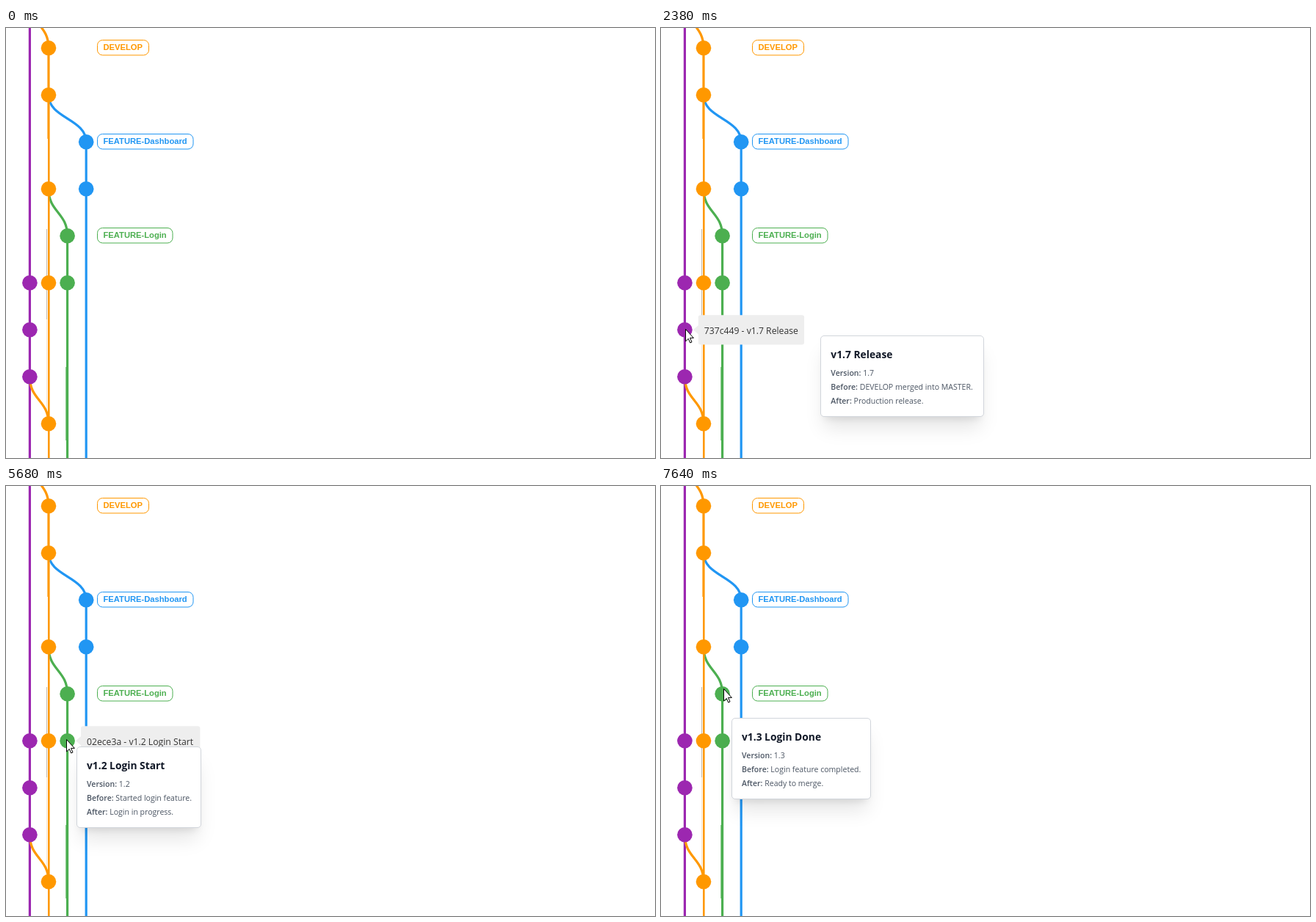
Animation, 884 px wide and 586 px high, one loop 8 s. Source, as an HTML page:

```html
<!DOCTYPE html>
<html lang="en">
<head>
<meta charset="utf-8">
<title>Branch graph</title>
<style>
  html, body { margin: 0; width: 100%; height: 100%; overflow: hidden; background: #fff; }
  #stage { position: relative; width: 884px; height: 586px; overflow: hidden; }
  svg { position: absolute; left: 0; top: 0; }
  .label { font: bold 11.2px "Liberation Sans", Arial, sans-serif; }
  .tip text { font: 12.2px "Open Sans", "Noto Sans", sans-serif; fill: #333; }
  .card {
    position: absolute; box-sizing: border-box; height: 111px; padding: 12px 13px 0;
    border: 1px solid #d1d5db; border-radius: 5px; background: #fff; color: #4b5563;
    font: 10.55px/19px "Open Sans", "Noto Sans", sans-serif; white-space: nowrap; opacity: 0;
    box-shadow: 0 20px 25px -5px rgba(0,0,0,.1), 0 8px 10px -6px rgba(0,0,0,.1);
  }
  .card h3 { margin: 0 0 3.5px; font-size: 13.8px; line-height: 25px; font-weight: 700; color: #111827; }
  .card p { margin: 0; }
  .card b { font-weight: 600; }
</style>
</head>
<body>
<div id="stage">
  <svg id="graph" width="884" height="586"></svg>
  <svg id="pointer" width="16" height="24" viewBox="-1 -1 16 24">
    <path d="M.5 .5V17L4.3 13.4L6.7 19L9 18L6.6 12.4H11.4Z" fill="#fff" stroke="#000" stroke-linejoin="round"/>
  </svg>
</div>
<script>
const LOOP = 8000;
const STEP = 1000 / 15;
const stage = document.getElementById('stage');
const graph = document.getElementById('graph');
const pointer = document.getElementById('pointer');

// Graph: one column per branch, one row per commit
const col = i => 32.4 + 25.6 * i;
const row = i => 27.3 + 64 * i;
const COLORS = ['#9c27b0', '#ff9800', '#4caf50', '#2196f3'];
const COMMITS = [[5, 6, 7], [0, 1, 3, 5, 8], [4, 5], [2, 3]];

const line = (d, color, width = 3.2) =>
  `<path d="${d}" fill="none" stroke="${color}" stroke-width="${width}"/>`;

const trunk = (c, top, bottom = 586) => line(`M${col(c)} ${top}V${bottom}`, COLORS[c]);

function branch(from, to, r) {
  const a = col(from), b = col(to), y = row(r), m = y + 32;
  return line(`M${a} ${y}C${a} ${m} ${b} ${m} ${b} ${y + 64}`, COLORS[to]);
}

const dots = (rows, c) => rows.map(r =>
  `<circle cx="${col(c)}" cy="${row(r)}" r="10.3" fill="${COLORS[c]}"/>`).join('');

function label(text, c, r, width) {
  const y = Math.round(row(r));
  return `<rect x="124.5" y="${y - 10.5}" width="${width}" height="20.5" rx="7" fill="#fff" stroke="${COLORS[c]}"/>
    <text class="label" x="132.5" y="${y + 3}" fill="${COLORS[c]}">${text}</text>`;
}

function tip(id, text, c, r, width) {
  const x = col(c) + 18.4, y = row(r);
  return `<g class="tip" id="${id}" visibility="hidden">
    <rect x="${x}" y="${y - 20}" width="${width}" height="40.3" rx="3" fill="#eee"/>
    <path d="M${x - 7} ${y}l7.5 -6.5v13z" fill="#eee"/>
    <text x="${x + 8}" y="${y + 5.6}">${text}</text></g>`;
}

graph.innerHTML =
  line('M55.5 274V397', '#c4b8a6', 1) + line('M55.5 397V525', '#f6e4cb', 1) +
  trunk(0, 0) + branch(1, 3, 1) + branch(1, 2, 3) + branch(0, 1, -1) + branch(0, 1, 7) +
  trunk(1, row(0), 151) + line('M58.3 151V586', COLORS[1], 2.6) +
  trunk(2, row(4)) + line('M81.7 462V562', COLORS[2], .8) + trunk(3, row(2)) +
  COMMITS.map(dots).join('') +
  label('DEVELOP', 1, 0, 70) +
  label('FEATURE-Dashboard', 3, 2, 130.5) +
  label('FEATURE-Login', 2, 4, 102.5) +
  tip('tipRelease', '737c449 - v1.7 Release', 0, 6, 144.3) +
  tip('tipLogin', '02ece3a - v1.2 Login Start', 2, 5, 162.4);

function card(title, version, before, after, width) {
  const el = document.createElement('div');
  el.className = 'card';
  el.style.width = width + 'px';
  el.innerHTML = `<h3>${title}</h3><p><b>Version:</b> ${version}</p>
    <p><b>Before:</b> ${before}</p><p><b>After:</b> ${after}</p>`;
  stage.insertBefore(el, pointer);
  return el;
}

// Motion
const ease = p => 1 - (1 - p) ** 2.2;
const smooth = p => p * p * (3 - 2 * p);
const ramp = (t, a, b) => Math.min(1, Math.max(0, (t - a) / (b - a)));
const move = (from, till, x, y, bend = 0, curve = ease) => ({ from, till, x, y, bend, curve });

// Follows the moves in turn; bend bows the path up or down.
function along(home, moves, t) {
  let [x, y] = home;
  for (const m of moves) {
    const p = m.curve(ramp(t, m.from, m.till));
    x += (m.x - x) * p;
    y += (m.y - y) * p + 2 * p * (1 - p) * m.bend;
  }
  return [x, y];
}

const cursor = {
  home: [709, 534],
  moves: [
    move(600, 800, 408, 436),
    move(930, 1750, 62, 409, -29),
    move(1780, 1960, 33, 410),
    move(3620, 4333, 87, 345),
    move(5420, 5620, 82, 345),
    move(6450, 7300, 83, 279, 0, smooth),
    move(7320, 7500, 85, 276)
  ]
};

const cards = [
  {
    el: card('v1.7 Release', '1.7', 'DEVELOP merged into MASTER.', 'Production release.', 223),
    home: [352, 446], show: [2067, 2333], hide: [3700, 3930],
    moves: [move(2133, 2333, 218, 419), move(2333, 2520, 47, 419)]
  }, {
    el: card('v1.2 Login Start', '1.2', 'Started login feature.', 'Login in progress.', 170),
    home: [93, 364], show: [4200, 4478], hide: [6600, 6820],
    moves: [move(5420, 5660, 96, 355), move(6470, 6533, 96, 353), move(6540, 6820, 99, 346)]
  }, {
    el: card('v1.3 Login Done', '1.3', 'Login feature completed.', 'Ready to merge.', 190),
    home: [96, 316], show: [7320, 7570], hide: [LOOP, LOOP + 1], moves: []
  }
];

const tips = [
  { el: document.getElementById('tipRelease'), on: 1930, off: 3700 },
  { el: document.getElementById('tipLogin'), on: 5460, off: 6680 }
];

function place(el, x, y) {
  el.style.left = x + 'px';
  el.style.top = y + 'px';
}

function draw(now) {
  const t = Math.floor(now % LOOP / STEP + .2) * STEP;
  const [x, y] = along(cursor.home, cursor.moves, t);
  place(pointer, Math.round(x) - 1, Math.round(y) - 1);
  pointer.style.visibility = t < 599 ? 'hidden' : 'visible';
  for (const { el, on, off } of tips)
    el.setAttribute('visibility', t >= on && t < off ? 'visible' : 'hidden');
  for (const { el, home, moves, show, hide } of cards) {
    place(el, ...along(home, moves, t));
    el.style.opacity = ramp(t, ...show) - ramp(t, ...hide);
  }
}

const start = performance.now();
function tick() {
  draw(performance.now() - start);
  requestAnimationFrame(tick);
}
tick();
</script>
</body>
</html>
```
